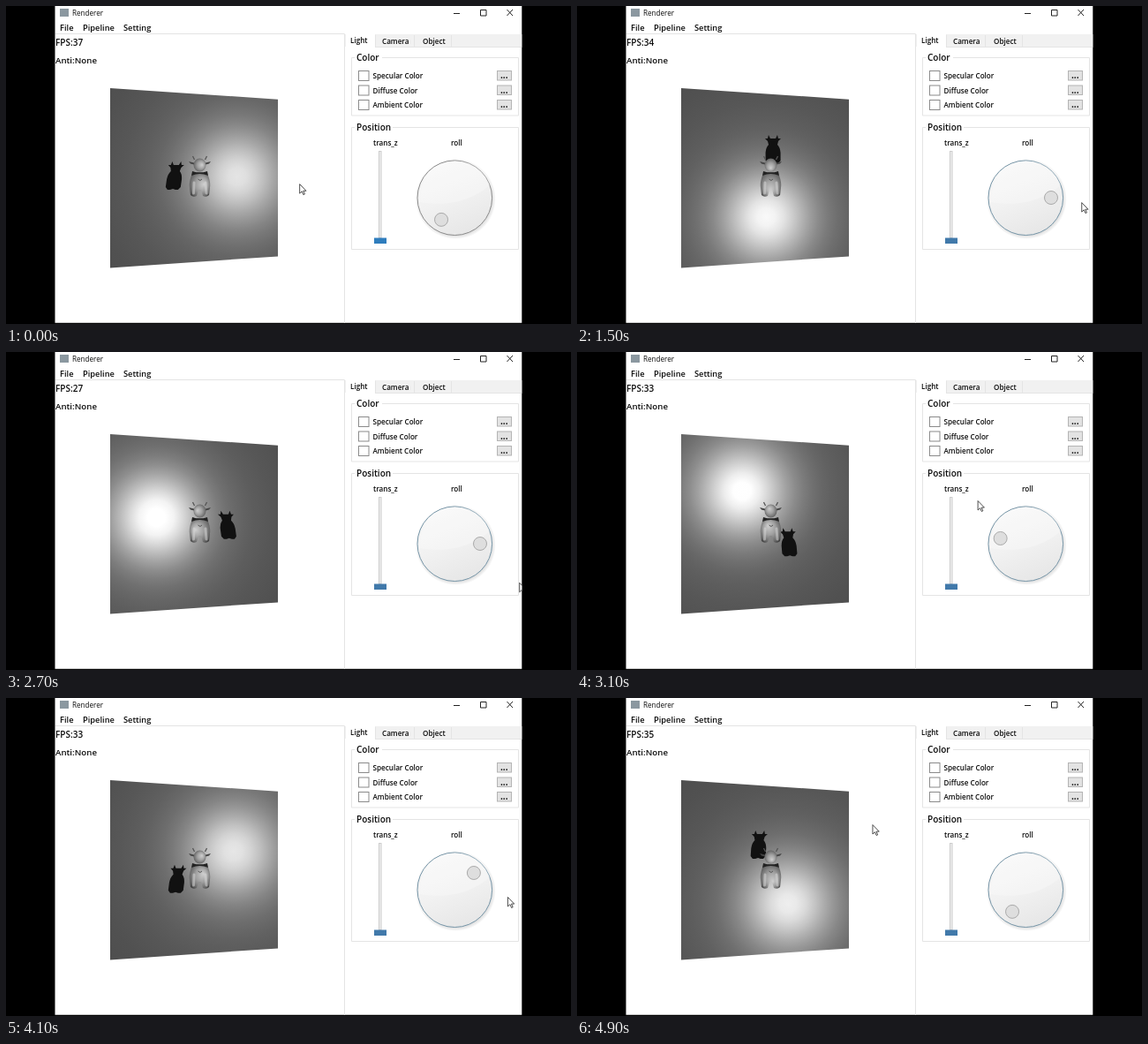
Write an HTML page that moves like this. It is 640 px wide and 360 px high and loops after 5000 ms.

```html
<!DOCTYPE html>
<html lang="en">
<head>
<meta charset="utf-8">
<title>Renderer</title>
<style>
html, body { margin: 0; width: 100%; height: 100%; overflow: hidden; background: #000; }
svg { display: block; width: 100vw; height: 100vh; }
text { font: 600 8.15px "Open Sans", "Noto Sans", sans-serif; fill: #0c0c0c; }
.menu { font-size: 9.3px; }
.big { font-size: 10px; }
.title { font-weight: 400; }
.dots { font-weight: 700; font-size: 10px; }
.line { fill: none; stroke: #e4e4e4; }
</style>
</head>
<body>
<svg viewBox="0 0 640 360">
  <defs>
    <clipPath id="win"><path d="M55.500 0H584.300V358.700H55.500z"/></clipPath>
    <radialGradient id="glow" gradientUnits="userSpaceOnUse" cx="0" cy="0" r="220"></radialGradient>
    <radialGradient id="skin" r=".65">
      <stop stop-color="#cfcfcf"/><stop offset=".45" stop-color="#a0a0a0"/>
      <stop offset=".8" stop-color="#686868"/><stop offset="1" stop-color="#2c2c2c"/>
    </radialGradient>
    <linearGradient id="face" x1=".3" y1="0" x2=".7" y2="1">
      <stop stop-color="#f8f8f8"/><stop offset=".5" stop-color="#f1f1f1"/><stop offset="1" stop-color="#e6e6e6"/>
    </linearGradient>
    <radialGradient id="drop">
      <stop offset=".88" stop-color="#999" stop-opacity=".4"/><stop offset="1" stop-color="#999" stop-opacity="0"/>
    </radialGradient>
  </defs>
  <rect width="640" height="360"/>
  <g clip-path="url(#win)">
    <rect x="55" width="530" height="359" fill="#fff"/>

    <rect x="61" y="3" width="10" height="9" fill="#8b98a0"/>
    <text class="title" x="75" y="10.5">Renderer</text>
    <path d="M507 8.500h7M537.500 4.500h6.500v6.500h-6.500zM567.500 4l6.500 7M574 4l-6.500 7" fill="none" stroke="#222"/>
    <text class="menu" x="61" y="28">File</text>
    <text class="menu" x="87" y="28">Pipeline</text>
    <text class="menu" x="133" y="28">Setting</text>
    <text class="big" id="fps" x="56" y="45"></text>
    <text class="big" x="56" y="65" style="font-size:9.7px">Anti:None</text>

    <path d="M118 93L308 105.700V283.400L118 296.500z" fill="url(#glow)"/>
    <path id="shade" fill="#111" d="M-5-17l2 4h6l2-4 1 4h3l-3 3-1 4q3 3 3.500 9v9l-2.500 3h-3l-3-1-3 1h-3l-2.500-3v-9q.5-6 3.500-9l-1-4-3-3h3z"/>
    <g fill="url(#skin)">
      <path d="M207 176l6 1.500v2l-4-1zM232 176l-6 1.500v2l4-1z" fill="#444"/>
      <path d="M213.500 174l-2-4M225.500 174l2-4" stroke="#555" stroke-width="1.300"/>
      <ellipse cx="219.500" cy="180" rx="7" ry="7.500"/>
      <path d="M210 192q9-8 19 0 3 8 2 14l-1 8q-3 3-7 1l-2-7h-3l-2 7q-4 2-7-1l-1-8q-1-6 2-14z"/>
      <path d="M211 187q8.500 3 17 0l1 5q-9.500-4-19 0z" fill="#222"/>
      <path d="M213 200l-.5 12M226 200l1 12" stroke="#ddd" stroke-width="3" stroke-linecap="round" opacity=".5"/>
      <path d="M217.500 196q2.500 3 4.500 0" fill="none" stroke="#555"/>
    </g>

    <rect x="384" y="32" width="201" height="14" fill="#f1f1f1"/>
    <rect x="385" y="31" width="33" height="16" fill="#fff"/>
    <path class="line" d="M56 31.500H383.500V359M418.500 46.500V32.500M418 46.500H585M462.500 33V46M504.500 33V46"/>
    <text x="390" y="42">Light</text>
    <text x="426" y="43">Camera</text>
    <text x="472" y="43">Object</text>

    <path class="line" d="M391.500 58.500h189v65.500h-189zM391.500 137.500h189v138h-189z"/>
    <path d="M395 53h31v10h-31zM395 132h43v10h-43z" fill="#fff"/>
    <text class="big" x="397" y="62">Color</text>
    <text class="big" x="397" y="141">Position</text>
    <g id="rows"></g>

    <text x="416" y="158">trans_z</text>
    <text x="504" y="158">roll</text>
    <rect x="422.500" y="164.500" width="2.500" height="98" fill="#eee" stroke="#ccc"/>
    <rect id="handle" x="417" y="262.500" width="14" height="6.500"/>

    <circle cx="509.300" cy="218.500" r="45.500" fill="url(#drop)"/>
    <circle id="dial" cx="508.300" cy="217.200" r="42.300" fill="url(#face)"/>
    <path d="M468 222q50 8 81-20-8-26-40-27-38 2-41 47z" fill="#fff" opacity=".22"/>
    <circle id="knob" r="7.500" fill="#dedede" stroke="#aaa"/>
    <path id="cursor" d="M0 0v10.500l2.500-2.300 1.700 3.800 1.500-.7-1.600-3.700h3.200z" fill="#fff" stroke="#222" stroke-width=".8"/>
  </g>
</svg>
<script>
const $ = id => document.getElementById(id);
const set = (id, attrs) => { for (const k in attrs) $(id).setAttribute(k, attrs[k]); };
const rad = deg => deg * Math.PI / 180;
const move = (x, y) => `translate(${x.toFixed(2)} ${y.toFixed(2)})`;
const polar = (angle, r) => move(508 + r * Math.cos(rad(angle)), 217 + r * Math.sin(rad(angle)));

$("rows").innerHTML = ["Specular", "Diffuse", "Ambient"].map((name, i) => `
  <g transform="translate(0 ${i * 16.5})">
    <rect x="399.500" y="73.500" width="11.500" height="11" fill="#fff" stroke="#8a8a8a"/>
    <text x="415.500" y="82">${name} Color</text>
    <rect x="556.500" y="73.500" width="16" height="10.500" fill="#e3e3e3" stroke="#b4b4b4"/>
    <text class="dots" x="560" y="82">...</text>
  </g>`).join("");

// Key poses: time, FPS, light angle, dial angle, pointer angle and distance from the dial
const poses = [
  [0, 37, 0, 121, 185, 176],
  [500, 36, 0, 121, 205, 48],
  [700, 35, 18, 212, 278, 35],
  [1500, 34, 92, 720, 725, 64],
  [2700, 27, 187, 1080, 1111, 86],
  [3500, 38, 275, 1464, 1493, 59],
  [4100, 33, 335, 1759, 1808, 61],
  [4900, 35, 420, 2281, 2363, 188]
];

function poseAt(t) {
  const i = poses.findIndex(p => p[0] > t);
  if (i < 0) return poses[poses.length - 1];
  const a = poses[i - 1], b = poses[i], u = (t - a[0]) / (b[0] - a[0]);
  return a.map((v, k) => v + (b[k] - v) * u);
}

function drawLight(angle) {
  const c = Math.cos(rad(angle)), s = Math.sin(rad(angle));
  let stops = "";
  for (let d = 0; d <= 220; d += 10) {
    const v = 68 + (85 - 20 * c) * Math.exp(-((d / 48) ** 2)) + 95 / (1 + (d / 65) ** 2);
    const g = Math.min(255, Math.round(v));
    stops += `<stop offset="${d / 220}" stop-color="rgb(${g},${g},${g})"/>`;
  }
  $("glow").innerHTML = stops;
  set("glow", { gradientTransform: move(216 + 46 * c, 193 + 46 * s) });
  set("shade", { transform: move(221 - 30 * c, 193 - 30 * s) + ` skewX(${-8 * c})` });
  set("skin", { fx: 0.5 + 0.2 * c, fy: 0.5 + 0.25 * s });
}

// The dial has a dead zone at the bottom
function dialStop(angle) {
  const a = angle % 360;
  return a > 60 && a < 120 ? (a < 90 ? 60 : 120) : a;
}

function draw() {
  const t = Math.floor(performance.now() % 5000 / 100) * 100;
  const [, fps, light, dial, turn, reach] = poseAt(t);
  const focus = t >= 500;
  $("fps").textContent = "FPS:" + Math.round(fps);
  drawLight(light);
  set("knob", { transform: polar(dialStop(dial), 29) });
  set("dial", { stroke: focus ? "#7796a8" : "#8c8c8c" });
  set("handle", { fill: focus ? "#4179aa" : "#2f7dbd" });
  set("cursor", { transform: polar(turn, reach) });
  requestAnimationFrame(draw);
}
draw();
</script>
</body>
</html>
```
